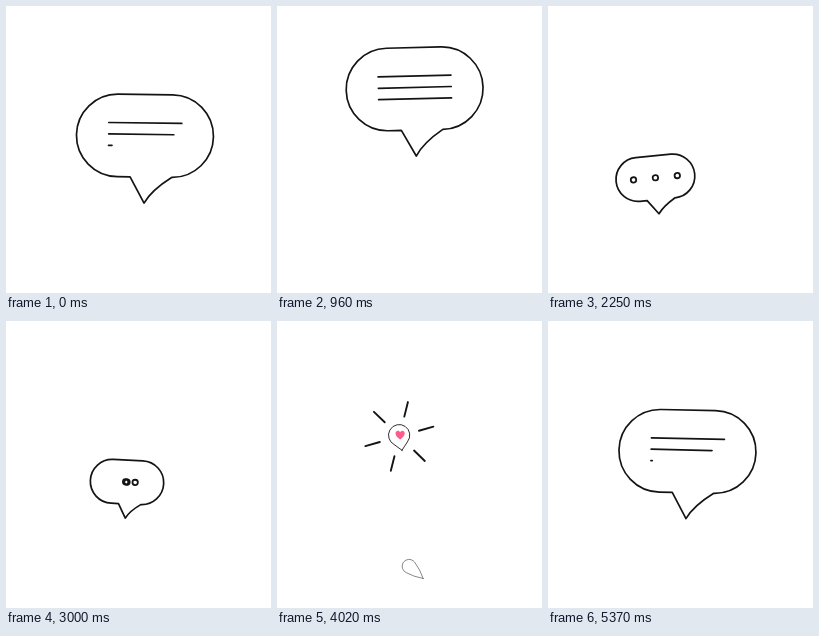
An HTML page with a canvas for the animation above (5.4 s loop, 265 by 287 pixels).

```html
<!DOCTYPE html>
<html lang="en">
<head>
<meta charset="utf-8">
<title>Chat bubbles</title>
<style>
  html, body { margin: 0; width: 100%; height: 100%; overflow: hidden; background: #fff; }
  canvas { display: block; width: 265px; height: 287px; }
</style>
</head>
<body>
<canvas id="stage"></canvas>
<script>
const LOOP = 5400, W = 265, H = 287, INK = '#141414', PINK = '#ff5c8e';
const GROW = 680, LEAVE = 650;
const canvas = document.getElementById('stage');
const ctx = canvas.getContext('2d');
const dpr = window.devicePixelRatio || 1;
canvas.width = W * dpr;
canvas.height = H * dpr;

const mix = (a, b, k) => a + (b - a) * k;
const progress = (t, from, to) => Math.min(1, Math.max(0, (t - from) / (to - from)));
const ease = (t, from, to) => (1 - Math.cos(Math.PI * progress(t, from, to))) / 2;
const backIn = k => 2.7 * k ** 3 - 1.7 * k ** 2;
const backOut = k => 1 - backIn(1 - k);
const radians = deg => deg * Math.PI / 180;

// Times inside a bubble are its age in ms.
const message = {
  born: 3900, leave: 2400, lean: 70,
  x: 147.5, shift: -10.2, drift: 2,
  rise: 76.5, dip: 11.5, float: 54, floatFrom: 1330, floatTo: 2740,
  rest: -2.9, sway: 12, peak: 560, period: 870, fade: 900
};
const reply = {
  born: 1330, leave: 2170, lean: 45,
  x: 130, shift: -19, drift: 14,
  rise: 57, dip: 4, float: 85, floatFrom: 1230, floatTo: 2900,
  rest: 0, sway: 7, peak: 430, period: 1080, fade: 3000
};

const ageOf = (b, t) => (t - b.born + LOOP) % LOOP;

// Place of the tail tip, swing around it, and size.
function pose(b, age) {
  const out = progress(age, b.leave, b.leave + LEAVE);
  const since = age - b.peak;
  const swing = b.sway * Math.exp(-since / b.fade) * Math.cos(2 * Math.PI * since / b.period);
  return {
    x: b.x + b.shift * ease(age, 0, 500) + b.drift * ease(age, 1000, 2200),
    y: 264 - b.rise * ease(age, 0, 640) + b.dip * ease(age, 780, 1270)
      - b.float * ease(age, b.floatFrom, b.floatTo),
    turn: radians(b.rest + swing - 30 * (1 - ease(age, 0, 560)) - b.lean * backIn(out)),
    size: Math.sin(Math.PI / 2 * progress(age, 0, GROW)) * (1 - out ** 3)
  };
}

function line(x1, y1, x2, y2) {
  ctx.beginPath();
  ctx.moveTo(x1, y1);
  ctx.lineTo(x2, y2);
  ctx.stroke();
}

// Capsule centred on the origin; bulge rounds the tail into a drop.
function bubble(half, r, base, reach, bulge) {
  const side = Math.max(0, base - half);
  const y = Math.sqrt(Math.max(0, r * r - side * side));
  const arc = Math.atan2(y, side);
  const cx = base * (0.5 + bulge), cy = (y + reach) / 2;
  ctx.beginPath();
  ctx.moveTo(0, reach);
  ctx.quadraticCurveTo(-cx, cy, -base, y);
  ctx.arc(-half, 0, r, Math.PI - arc, Math.PI * 1.5);
  ctx.arc(half, 0, r, -Math.PI / 2, arc);
  ctx.quadraticCurveTo(cx, cy, 0, reach);
  ctx.closePath();
  ctx.fillStyle = '#fff';
  ctx.fill();
  ctx.lineWidth = 1.7;
  ctx.stroke();
}

function place(p, reach, draw) {
  if (p.size < 0.01) return;
  ctx.save();
  ctx.translate(p.x, p.y);
  ctx.rotate(p.turn);
  ctx.scale(p.size, p.size);
  ctx.translate(0, -reach);
  draw();
  ctx.restore();
}

function drawMessage(age) {
  const open = ease(age, 120, 520) * (1 - ease(age, message.leave + 300, message.leave + LEAVE));
  const reach = 67.3;
  place(pose(message, age), reach, () => {
    bubble(27.2 * open, mix(25, 41.3, open), mix(24, 14.3, open), reach, 0.25 * (1 - open));
    [524, 1072, 1425].forEach((start, i) => {
      const len = 73 * ease(age, start, start + 545);
      const y = (11.4 * i - 12.8) * open;
      if (len > 0) line(-36.3 * open, y, (len - 36.3) * open, y);
    });
  });
}

function drawDots(age) {
  const gone = 1 - ease(age, 1800, 1890);
  ctx.lineWidth = 1.8;
  for (let i = 0; i < 3; i++) {
    const r = 2.7 * ease(age, 270 + 90 * i, 430 + 90 * i) * gone;
    const apart = 1 - ease(age, 1370 + 25 * i, 1730 + 60 * i);
    if (r < 0.05) continue;
    ctx.beginPath();
    ctx.arc((i - 1) * 22 * apart, 0, r, 0, Math.PI * 2);
    ctx.stroke();
  }
}

function drawHeart(k, turn) {
  ctx.save();
  ctx.translate(2, 0);
  ctx.rotate(-turn);
  ctx.scale(k, k);
  ctx.beginPath();
  ctx.moveTo(0, -5.5);
  for (const s of [-1, 1]) {
    ctx.moveTo(0, -5.5);
    ctx.bezierCurveTo(3 * s, -11, 9.5 * s, -9, 9.5 * s, -3);
    ctx.bezierCurveTo(9.5 * s, 2.5, 4 * s, 6, 0, 9.5);
  }
  ctx.fillStyle = PINK;
  ctx.fill();
  ctx.fillRect(-0.4, -5.5, 0.8, 14);
  ctx.restore();
}

function drawRays(age, p, reach) {
  const len = 15 * ease(age, 1900, 2090) * (1 - ease(age, 2730, 2820));
  if (len < 0.1) return;
  const inner = 42 * p.size, up = 0.92 * reach * p.size;
  ctx.save();
  ctx.translate(p.x + up * Math.sin(p.turn), p.y - up * Math.cos(p.turn));
  ctx.rotate(radians(-16));
  ctx.lineWidth = 1.9;
  for (let i = 0; i < 6; i++) {
    line(inner, 0, inner + len, 0);
    ctx.rotate(Math.PI / 3);
  }
  ctx.restore();
}

function drawReply(age) {
  const p = pose(reply, age);
  const open = ease(age, 70, 370), close = ease(age, 1530, 2070);
  const drop = ease(age, 2070, 2670);
  const reach = mix(36.2, 31.6, drop);
  const base = mix(19, 10.5, open) - 3 * ease(age, 1370, 1670) + 6.5 * drop;
  drawRays(age, p, reach);
  place(p, reach, () => {
    bubble(17.6 * open * (1 - close), 21.9, base, reach, 0.2 * (1 - open));
    drawDots(age);
    const grown = progress(age, 1750, 2050);
    if (grown > 0) drawHeart(backOut(grown), p.turn);
  });
}

function frame(t) {
  ctx.setTransform(dpr, 0, 0, dpr, 0, 0);
  ctx.fillStyle = '#fff';
  ctx.fillRect(0, 0, W, H);
  ctx.strokeStyle = INK;
  ctx.lineCap = 'round';
  ctx.lineJoin = 'round';
  drawMessage(ageOf(message, t));
  drawReply(ageOf(reply, t));
}

let begin = null;
function tick() {
  const now = performance.now();
  if (begin === null) begin = now;
  frame((now - begin) % LOOP);
  requestAnimationFrame(tick);
}
tick();
</script>
</body>
</html>
```
